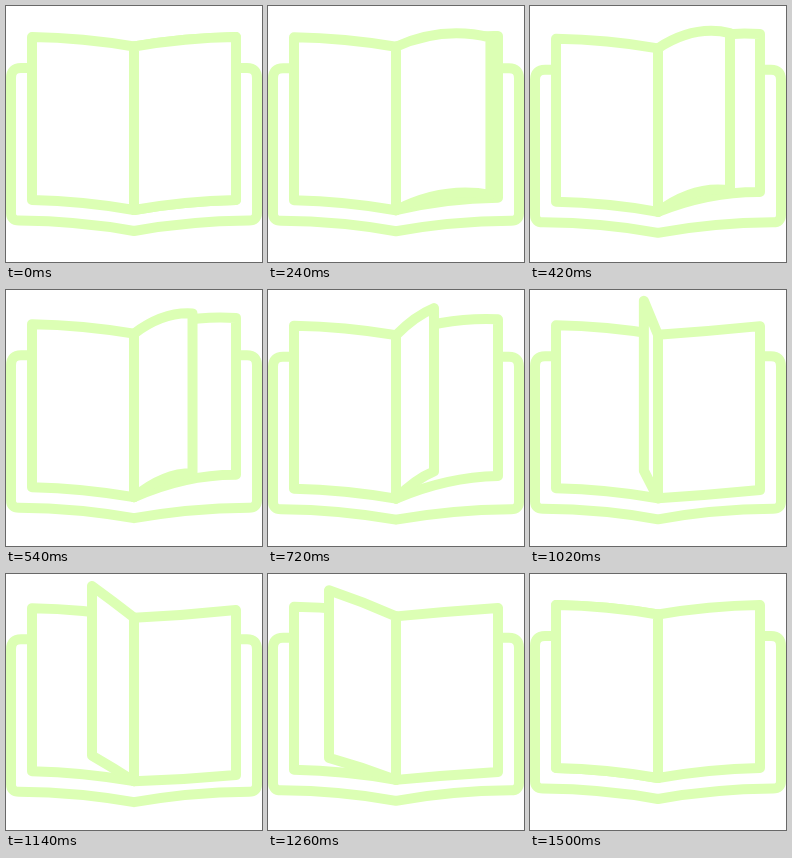
Animation of 256x256 px, one loop 1.68 s. Source, as an HTML page:

```html
<!DOCTYPE html>
<html lang="en">
<head>
<meta charset="utf-8">
<title>Turning page</title>
<style>
  html, body { margin: 0; width: 100%; height: 100%; overflow: hidden; background: #fff; }
  svg { display: block; width: 100%; height: 100%; }
  path { fill: #fff; stroke: #dcffb4; stroke-width: 10; stroke-linejoin: round; stroke-linecap: round; }
</style>
</head>
<body>
<svg viewBox="0 0 256 256">
  <path id="cover"/>
  <path id="left"/>
  <path id="right"/>
  <path id="turn"/>
</svg>
<script>
const LOOP = 1680, STEP = 60, START = 180, END = 1500;
const SPINE = 128, WIDTH = 102, TOP = 31, BOTTOM = 194, BEND = 4;

// time, x of the turning edge, sway of the page below it
const KEYS = [
  [START, SPINE + WIDTH, 0], [420, 200, -8], [720, 166, -8], [900, 140, 3],
  [1140, 86, 7], [1260, 61, 4], [END, SPINE - WIDTH, 0]
];

function tangent(i, col) {
  const a = KEYS[Math.max(i - 1, 0)];
  const b = KEYS[Math.min(i + 1, KEYS.length - 1)];
  return (b[col] - a[col]) / (b[0] - a[0]);
}

// Smooth Hermite curve through one column of KEYS
function glide(t, col) {
  let i = 0;
  while (i < KEYS.length - 2 && t >= KEYS[i + 1][0]) i++;
  const a = KEYS[i], b = KEYS[i + 1];
  const span = b[0] - a[0], u = (t - a[0]) / span, v = 1 - u;
  return v * v * (1 + 2 * u) * a[col] + u * u * (3 - 2 * u) * b[col] +
    span * u * v * (v * tangent(i, col) - u * tangent(i + 1, col));
}

function setPath(id, d) {
  document.getElementById(id).setAttribute("d", d);
}

// A page from the spine to x, its long sides bowed upwards by bend
function page(drop, x, top, bottom, bend) {
  const spineTop = 40.5 + drop, spineBottom = 204 + drop, mid = (SPINE + x) / 2;
  return `M${SPINE} ${spineTop}Q${mid} ${(spineTop + top) / 2 - bend} ${x} ${top}V${bottom}` +
    `Q${mid} ${(spineBottom + bottom) / 2 - bend} ${SPINE} ${spineBottom}Z`;
}

function cover(drop) {
  const y = n => n + drop;
  return `M27 ${y(62)}H15Q5 ${y(62)} 5 ${y(72)}V${y(207)}` +
    `Q5 ${y(214.5)} 13 ${y(214.5)}Q73 ${y(215)} 128 ${y(225)}` +
    `Q183 ${y(215)} 243 ${y(214.5)}Q251 ${y(214.5)} 251 ${y(207)}` +
    `V${y(72)}Q251 ${y(62)} 241 ${y(62)}H229`;
}

function draw(time) {
  const t = Math.min(Math.max(time, START), END);
  const drop = 5 * Math.sin(Math.PI * (t - START) / (END - START)) ** 1.6;
  const x = glide(t, 1), sway = glide(t, 2);

  // Cosine and sine of the turning angle
  const c = Math.min(1, Math.max(-1, (x - SPINE) / WIDTH));
  const s = Math.sqrt(1 - c * c);
  const lift = s * (19.4 - 9.5 * c - 14.4 * c * c);
  const curl = BEND * c * c + 40 * s * Math.max(c, 0) ** 2;

  setPath("cover", cover(drop));
  setPath("left", page(drop, SPINE - WIDTH, TOP + drop, BOTTOM + drop, BEND));
  setPath("right", page(drop, SPINE + WIDTH, TOP + (drop + sway) / 2, BOTTOM + sway, BEND - 0.8 * sway));
  setPath("turn", page(drop, x, TOP - lift, BOTTOM - 13.5 * s, curl));
}

function tick() {
  const t = performance.now() % LOOP;
  draw(Math.floor(t / STEP) * STEP);
  requestAnimationFrame(tick);
}
tick();
</script>
</body>
</html>
```
